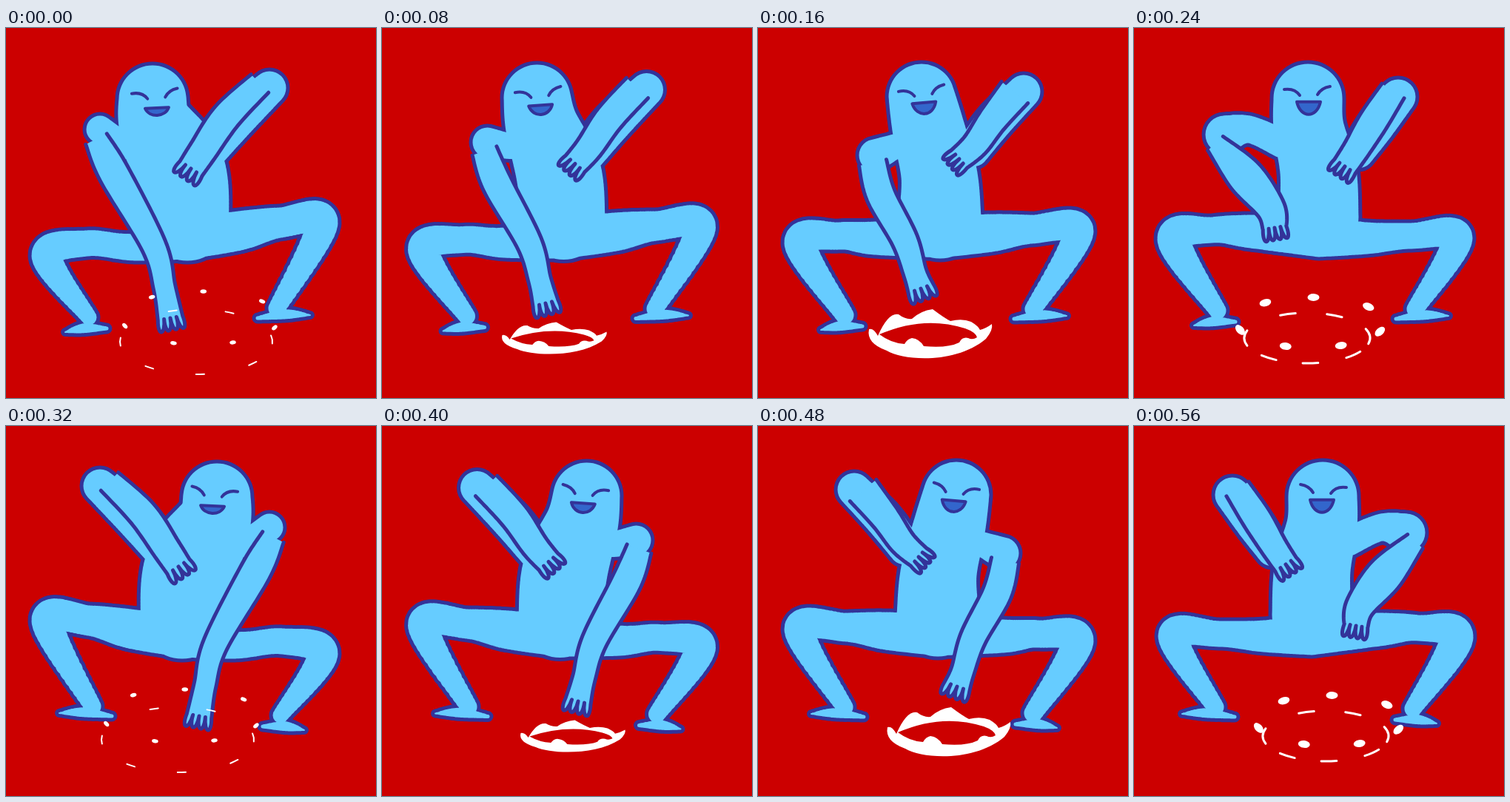
An HTML page that plays this animation: 500 by 500 pixels, repeating every 640 ms.

```html
<!DOCTYPE html>
<html lang="en">
<head>
<meta charset="utf-8">
<title>Splash dance</title>
<style>
  html, body { margin: 0; width: 100%; height: 100%; overflow: hidden; background: #c00; }
  svg { display: block; width: 100%; height: 100%; }
  path { fill: none; stroke: #339; stroke-width: 5; stroke-linecap: round; stroke-linejoin: round; }
  .edge { stroke-width: 10; }
  .skin { fill: #6cf; stroke: none; }
  .forearm { fill: #6cf; }
  .face { stroke-width: 4; }
  .mouth { fill: #36c; stroke-width: 4; }
  .crown { fill: #fff; stroke: none; fill-rule: evenodd; }
  .drop { fill: #fff; }
  .streak { stroke: #fff; }
  .step { visibility: hidden; animation: show 640ms step-end infinite; }
  @keyframes show {
    0% { visibility: visible; }
    12.5%, 100% { visibility: hidden; }
  }
</style>
</head>
<body>
<svg id="stage" viewBox="0 0 500 500"></svg>
<script>
// Joints are [x, y, radius]; face is [x, y, mouth opening, tilt].
const reach = {
  mirror: 483,
  face: [203, 90, 10, -3],
  torso: [[198, 96, 48], [202, 130, 52], [232, 190, 66], [245, 258, 59]],
  legL: [[173, 296, 21], [110, 291, 20], [55, 308, 23], [112, 391, 13]],
  legR: [[315, 274, 29], [370, 263, 23], [427, 264, 24], [366, 379, 14]],
  lowUpper: [[160, 160, 20], [127, 137, 21]],
  lowFore: [[122, 150, 16], [146, 197, 21], [200, 295, 17], [214, 350, 15], [222, 392, 17]],
  highUpper: [[265, 175, 28], [305, 128, 30], [356, 81, 25]],
  highFore: [[343, 75, 17], [298, 119, 20], [266, 166, 19], [250, 190, 18]]
};
const lift = {
  mirror: 489,
  face: [223, 86, 15, -5],
  torso: [[221, 93, 47], [230, 135, 51], [245, 200, 54], [246, 256, 58]],
  legL: [[157, 284, 25], [110, 281, 21], [57, 291, 24], [117, 388, 15]],
  legR: [[315, 277, 28], [370, 272, 22], [433, 275, 23], [372, 380, 14]],
  lowUpper: [[185, 160, 19], [158, 172, 24]],
  lowFore: [[155, 182, 19], [166, 226, 20], [198, 286, 18], [212, 330, 16], [220, 352, 18]],
  highUpper: [[290, 165, 25], [320, 126, 27], [359, 86, 25]],
  highFore: [[347, 87, 23], [317, 124, 20], [294, 157, 18], [272, 177, 16]]
};
const rise = {
  mirror: 490,
  face: [236, 86, 17, 0],
  torso: [[235, 95, 49], [236, 135, 50], [249, 195, 54], [250, 255, 56]],
  legL: [[158, 275, 25], [105, 273, 20], [54, 286, 25], [113, 382, 14]],
  legR: [[315, 284, 24], [375, 281, 20], [437, 284, 23], [380, 380, 14]],
  lowUpper: [[200, 156, 22], [155, 137, 21], [122, 144, 28]],
  lowFore: [[110, 156, 14], [150, 200, 25], [184, 243, 20], [190, 270, 16]],
  highUpper: [[303, 168, 24], [327, 133, 27], [357, 93, 26]],
  highFore: [[350, 85, 18], [324, 125, 20], [301, 163, 18], [285, 187, 17]]
};

const blend = (a, b) =>
  typeof a === 'number' ? (a + b) / 2 :
  Array.isArray(a) ? a.map((v, i) => blend(v, b[i])) :
  Object.fromEntries(Object.keys(a).map(k => [k, blend(a[k], b[k])]));

// Samples a smooth curve through the joints, radius included.
function spline(joints, steps = 16) {
  const out = [];
  for (let i = 0; i < joints.length - 1; i++) {
    const b = joints[i], c = joints[i + 1];
    const a = joints[i - 1] || b, d = joints[i + 2] || c;
    for (let s = i ? 1 : 0; s <= steps; s++) {
      const t = s / steps, u = 1 - t;
      out.push(b.map((v, k) => {
        const c1 = v + (c[k] - a[k]) / 6, c2 = c[k] - (d[k] - v) / 6;
        return u * u * u * v + 3 * u * u * t * c1 + 3 * u * t * t * c2 + t * t * t * c[k];
      }));
    }
  }
  return out;
}

const disc = ([x, y, radius]) => {
  const r = radius - 2.5;
  return `M${x - r} ${y}a${r} ${r} 0 1 0 ${2 * r} 0a${r} ${r} 0 1 0 ${-2 * r} 0`;
};
const limb = joints => spline(joints).map(disc).join('');

function leg(joints, [pelvisX, pelvisY], heel, toe) {
  const [x, y] = joints[joints.length - 1];
  const mid = heel.map((v, k) => v * .45 + toe[k] * .55);
  return limb([[pelvisX, pelvisY + 27, 30], ...joints]) +
    limb([[x + heel[0], y + heel[1], 5], [x + mid[0], y + mid[1] - 3, 9], [x + toe[0], y + toe[1], 3.5]]);
}

// Left open at the elbow, so that it merges with the upper arm; ends in four fingers.
function forearm(joints) {
  const spine = spline(joints), last = spine.length - 1;
  const heading = i => {
    const a = spine[Math.max(i - 1, 0)], b = spine[Math.min(i + 1, last)];
    const length = Math.hypot(b[0] - a[0], b[1] - a[1]);
    return [(b[0] - a[0]) / length, (b[1] - a[1]) / length];
  };
  const offset = (i, across, along = 0) => {
    const [x, y, r] = spine[i], [dx, dy] = heading(i);
    return [x - dy * r * across + dx * along, y + dx * r * across + dy * along];
  };
  let d = 'M' + spine.map((_, i) => offset(i, 1)).join('L');
  for (let f = 0; f < 4; f++) {
    const from = 1 - f / 2, to = from - .5;
    d += `C${offset(last, from * 1.25, 22)} ${offset(last, to * 1.25, 22)} ${offset(last, to)}`;
  }
  return d + 'L' + spine.map((_, i) => offset(i, -1)).reverse().join('L');
}

const path = (cls, d, extra = '') => `<path class="${cls}" d="${d}" ${extra}/>`;

function figure(p) {
  const pelvis = p.torso[p.torso.length - 1];
  const body = limb(p.torso) + limb(p.lowUpper) + limb(p.highUpper) +
    leg(p.legL, pelvis, [24, 15], [-32, 20]) + leg(p.legR, pelvis, [-26, 13], [45, 9]);
  const [x, y, gape, tilt] = p.face;
  return path('edge', body) + path('skin', body) +
    path('forearm', forearm(p.lowFore)) + path('forearm', forearm(p.highFore)) +
    `<g transform="translate(${x} ${y}) rotate(${tilt})">` +
    path('face', 'M-33-3q14-2 21 8M12 4q5-9 17-11') +
    path('mouth', `M-16 ${24 - gape * .6}h32c-5 ${gape * 1.33}-27 ${gape * 1.33}-32 0z`) + '</g>';
}

const ring = path('crown',
  'M150 407q6-2 12 9q14-32 28-29 9 7 18 6 12-11 28-13 16 12 24 16 16-4 28 1 10 6 12 11 8-2 16-8 2 8-8 20' +
  'c-40 34-110 30-134 16q-28-10-24-29z' +
  'M164 414q60-26 116-8 14 5 16 12-6 4-12 1-8-2-12 6-16 8-48 5-6-10-16-11-6 1-10 8-18-1-34-13z');

const dropAngles = [-128, -88, -39, 21, 66, 110, 163];
const streakAngles = [-108, -64, -4, 42, 87, 128, 180];

// Drops and streaks lie on two flat rings [cx, cy, rx, ry].
function spray(dropRing, streakRing, size, width) {
  const at = ([cx, cy, rx, ry], a) => [cx + rx * Math.cos(a), cy + ry * Math.sin(a)];
  const rad = Math.PI / 180;
  const drops = dropAngles.map(deg => {
    const a = deg * rad;
    const tilt = Math.atan2(dropRing[3] * Math.cos(a), -dropRing[2] * Math.sin(a)) / rad;
    return `<ellipse class="drop" rx="${size}" ry="${size * .62}"
      transform="translate(${at(dropRing, a)}) rotate(${tilt})"/>`;
  });
  const streaks = streakAngles.map(deg => {
    const a = deg * rad, [, , rx, ry] = streakRing;
    const span = size * 1.3 / Math.hypot(rx * Math.sin(a), ry * Math.cos(a));
    return path('streak', `M${at(streakRing, a - span)}A${rx} ${ry} 0 0 1 ${at(streakRing, a + span)}`,
      `style="stroke-width:${width}"`);
  });
  return drops.concat(streaks).join('');
}

const poses = [reach, blend(reach, lift), lift, rise];
const splashes = [
  spray([238, 392, 107, 36], [232, 424, 103, 44], 4.3, 2),
  `<g transform="translate(233 430) scale(.85 .65) translate(-233 -430)">${ring}</g>`,
  ring,
  spray([239, 398, 100, 34], [234, 419, 85, 34], 8, 3)
];

let markup = '';
for (let i = 0; i < 8; i++) {
  const k = i % 4, flipped = i > 3;
  const flip = flipped ? `translate(${poses[k].mirror} 0) scale(-1 1)` : '';
  // The last drops of a splash linger into the next reach.
  const shift = flipped !== (k === 0) ? 25 : 0;
  markup += `<g class="step" style="animation-delay:${(i - 8) * 80}ms">
    <g transform="${flip}">${figure(poses[k])}</g>
    <g transform="translate(${shift} 0)">${splashes[k]}</g></g>`;
}
document.getElementById('stage').innerHTML = markup;
</script>
</body>
</html>
```
